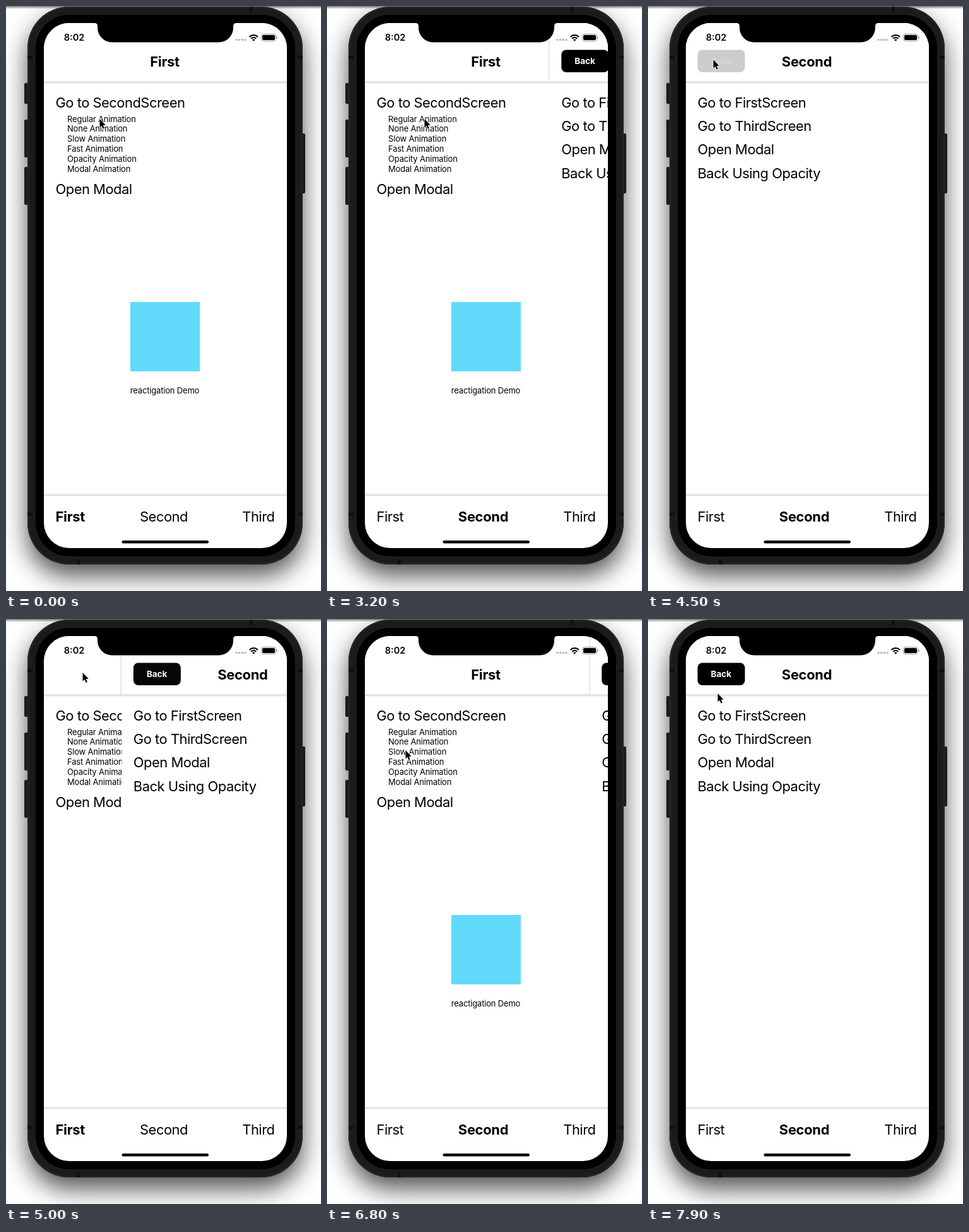
An HTML page with a canvas that plays this animation: 499x927 px, repeating every 8000 ms.

```html
<!DOCTYPE html>
<html lang="en">
<head>
<meta charset="utf-8">
<title>Navigation demo</title>
<style>
html, body { margin: 0; width: 100%; height: 100%; overflow: hidden; background: #fff; }
canvas { display: block; width: 499px; height: 927px; }
</style>
</head>
<body>
<canvas id="stage"></canvas>
<script>
const W = 499, H = 927, LOOP = 8000;
const SCREEN = { x: 60, y: 27, w: 385, h: 832, r: 40 };
const canvas = document.getElementById('stage');
const ctx = canvas.getContext('2d');
const dpr = window.devicePixelRatio || 1;
canvas.width = W * dpr;
canvas.height = H * dpr;

const FAMILY = 'Inter, Roboto, "Liberation Sans", sans-serif';
const STYLES = {
  large: { font: `400 21.9px ${FAMILY}`, track: '-0.48px' },
  bold: { font: `700 21.9px ${FAMILY}`, track: '-0.3px' },
  small: { font: `400 12.95px ${FAMILY}`, track: '-0.15px' },
  button: { font: `700 13.6px ${FAMILY}`, track: '0px' },
  clock: { font: `600 14.5px ${FAMILY}`, track: '0px' }
};

// time, x, y of the pointer tip
const POINTER = [
  [0, 148, 179], [100, 146, 179], [300, 142, 180], [500, 142, 180],
  [900, 117, 181], [1400, 169, 181], [1600, 174, 181], [2050, 125, 182],
  [2300, 128, 181], [2500, 154, 179], [3700, 154, 179], [3800, 134, 110],
  [3900, 118, 93], [4200, 103, 85], [4700, 103, 85], [5000, 121, 85],
  [5600, 123, 100], [6000, 136, 160], [6300, 124, 208], [7600, 124, 208],
  [7900, 110, 118], [8000, 109, 112]
];
const OPTIONS = ['Regular', 'None', 'Slow', 'Fast', 'Opacity', 'Modal'];
const LINKS = ['Go to FirstScreen', 'Go to ThirdScreen', 'Open Modal', 'Back Using Opacity'];

const clamp = v => Math.max(0, Math.min(1, v));

// cubic-bezier(.42, 0, 1, 1)
function easeIn(x) {
  let lo = 0, hi = 1;
  for (let i = 0; i < 22; i++) {
    const s = (lo + hi) / 2, q = 1 - s;
    if (1.26 * s * q * q + 3 * s * s * q + s * s * s < x) lo = s; else hi = s;
  }
  return 3 * lo * lo * (1 - lo) + lo * lo * lo;
}

function slide(t, start, length) {
  const p = clamp((t - start) / length);
  return p < 0.5 ? easeIn(2 * p) / 2 : 1 - easeIn(2 - 2 * p) / 2;
}

function pressed(t, down, up) {
  return t < down ? 1 : 0.2 + 0.8 * clamp((t - up) / 250);
}

function pointerAt(t) {
  let i = 1;
  while (i < POINTER.length - 1 && POINTER[i][0] < t) i++;
  const a = POINTER[i - 1], b = POINTER[i];
  const k = clamp((t - a[0]) / (b[0] - a[0]));
  return [a[1] + (b[1] - a[1]) * k, a[2] + (b[2] - a[2]) * k];
}

function rect(x, y, w, h, color) {
  ctx.fillStyle = color;
  ctx.fillRect(x, y, w, h);
}

function round(x, y, w, h, r, color) {
  ctx.fillStyle = color;
  ctx.beginPath();
  ctx.roundRect(x, y, w, h, r);
  ctx.fill();
}

function text(str, x, y, style, align = 'left', color = '#000') {
  ctx.font = STYLES[style].font;
  ctx.letterSpacing = STYLES[style].track;
  ctx.textAlign = align;
  ctx.fillStyle = color;
  ctx.fillText(str, x, y);
}

function fade(x0, y0, x1, y1, from, to) {
  const g = ctx.createLinearGradient(x0, y0, x1, y1);
  g.addColorStop(0, from);
  g.addColorStop(1, to);
  return g;
}

function withAlpha(alpha, draw) {
  ctx.save();
  ctx.globalAlpha = alpha;
  draw();
  ctx.restore();
}

function phone() {
  rect(0, 0, W, H, '#fff');
  ctx.save();
  ctx.shadowColor = 'rgba(0,0,0,.68)';
  ctx.shadowBlur = 38 * dpr;
  ctx.shadowOffsetY = 18 * dpr;
  round(34, 1, 436, 884, 66, '#222');
  ctx.restore();
  rect(0, 0, W, 5, fade(0, 0, 0, 5, 'rgba(60,60,60,.7)', 'rgba(90,90,90,0)'));
  for (const [y, h] of [[122, 33], [180, 60], [255, 60]]) round(29, y, 7, h, 2, '#1c1c1c');
  round(467, 202, 7, 95, 2, '#1c1c1c');
  round(34, 1, 436, 884, 66, '#252525');
  round(36.5, 3.5, 431, 879, 63, '#1b1b1b');
  for (const y of [79, 803]) {
    rect(34, y, 8, 5, '#101010');
    rect(462, y, 8, 5, '#101010');
  }
  rect(386, 1, 5, 8, '#101010');
  rect(112, 877, 5, 8, '#101010');
  round(47, 14, 411, 858, 53, '#000');
}

function header(title) {
  rect(60, 27, 385, 93, '#fff');
  rect(60, 119.5, 385, 4.5, fade(0, 119.5, 0, 124, 'rgba(0,0,0,.17)', 'rgba(0,0,0,0)'));
  text(title, 251.5, 96, 'bold', 'center');
}

function firstScreen(t) {
  rect(60, 27, 385, 750, '#fff');
  header('First');
  text('Go to SecondScreen', 78.5, 161, 'large');
  const alpha = { Regular: pressed(t, 2760, 2960), Slow: pressed(t, 6450, 6560) };
  OPTIONS.forEach((name, i) => withAlpha(alpha[name] ?? 1, () =>
    text(name + ' Animation', 97, 183.6 + i * 15.8, 'small')));
  text('Open Modal', 78.5, 297.5, 'large');
  rect(197, 469, 110, 110, '#61dafb');
  text('reactigation Demo', 251.5, 613.5, 'small', 'center');
}

function secondScreen(t, dx) {
  ctx.save();
  ctx.translate(dx, 0);
  rect(57.5, 27, 2.5, 93, fade(57.5, 0, 60, 0, 'rgba(0,0,0,0)', 'rgba(0,0,0,.2)'));
  rect(60, 27, 385, 750, '#fff');
  header('Second');
  withAlpha(pressed(t, 4450, 4760), () => {
    round(78.5, 69.5, 75, 35.5, 7.5, '#000');
    text('Back', 115.8, 92.4, 'button', 'center', '#fff');
  });
  LINKS.forEach((label, i) => text(label, 78.5, 161 + i * 37.2, 'large'));
  ctx.restore();
}

function tabs(active) {
  rect(60, 776, 385, 83, '#fff');
  rect(60, 772, 385, 4, fade(0, 772, 0, 776, 'rgba(0,0,0,0)', 'rgba(0,0,0,.16)'));
  const at = [[78.5, 'left'], [active === 1 ? 247.5 : 250, 'center'], [425.5, 'right']];
  ['First', 'Second', 'Third'].forEach((label, i) =>
    text(label, at[i][0], 816.5, i === active ? 'bold' : 'large', at[i][1]));
  round(183.5, 847, 137.5, 4.5, 2.25, '#000');
}

function notch() {
  ctx.fillStyle = '#000';
  ctx.beginPath();
  ctx.moveTo(140, 26);
  ctx.lineTo(140, 27);
  ctx.quadraticCurveTo(145, 27, 145, 32);
  ctx.arcTo(145, 57.5, 170, 57.5, 23);
  ctx.lineTo(336, 57.5);
  ctx.arcTo(360, 57.5, 360, 32, 23);
  ctx.lineTo(360, 32);
  ctx.quadraticCurveTo(360, 27, 365, 27);
  ctx.lineTo(365, 26);
  ctx.fill();
}

function statusBar() {
  text('8:02', 108, 55.2, 'clock', 'center');
  for (let i = 0; i < 4; i++) round(363.3 + i * 4.6, 51.8, 3.6, 3.6, 1.8, '#bbb');
  ctx.strokeStyle = '#000';
  ctx.lineWidth = 2.2;
  for (const r of [5.6, 9.4]) {
    ctx.beginPath();
    ctx.arc(392.3, 55.6, r, -Math.PI * 0.75, -Math.PI * 0.25);
    ctx.stroke();
  }
  ctx.fillStyle = '#000';
  ctx.beginPath();
  ctx.moveTo(392.3, 55.8);
  ctx.arc(392.3, 55.8, 3.2, -Math.PI * 0.75, -Math.PI * 0.25);
  ctx.fill();
  ctx.strokeStyle = '#999';
  ctx.lineWidth = 1;
  ctx.beginPath();
  ctx.roundRect(404.5, 44.5, 23, 11, 3);
  ctx.stroke();
  round(406, 46, 20, 8, 1.7, '#000');
  round(428.5, 48, 1.3, 4, 0.6, '#999');
}

function pointer(x, y) {
  ctx.save();
  ctx.translate(x, y);
  ctx.beginPath();
  ctx.moveTo(0.5, 0);
  ctx.lineTo(0.5, 13.4);
  ctx.lineTo(3.5, 10.7);
  ctx.lineTo(5.6, 15.6);
  ctx.lineTo(7.8, 14.6);
  ctx.lineTo(5.7, 9.9);
  ctx.lineTo(9.7, 9.7);
  ctx.closePath();
  ctx.lineJoin = 'round';
  ctx.lineWidth = 1.6;
  ctx.strokeStyle = '#fff';
  ctx.stroke();
  ctx.fillStyle = '#000';
  ctx.fill();
  ctx.restore();
}

function render(t) {
  ctx.setTransform(dpr, 0, 0, dpr, 0, 0);
  phone();
  ctx.save();
  ctx.beginPath();
  ctx.roundRect(SCREEN.x, SCREEN.y, SCREEN.w, SCREEN.h, SCREEN.r);
  ctx.clip();
  firstScreen(t);
  const shown = slide(t, 3060, 440) - slide(t, 4833, 440) + slide(t, 6640, 1000);
  if (shown > 0.0005) secondScreen(t, SCREEN.w * (1 - shown));
  tabs((t >= 2980 && t < 4790) || t >= 6590 ? 1 : 0);
  statusBar();
  ctx.restore();
  notch();
  pointer(...pointerAt(t));
}

const begin = performance.now();
function tick() {
  render((performance.now() - begin) % LOOP);
  requestAnimationFrame(tick);
}
tick();
</script>
</body>
</html>
```
